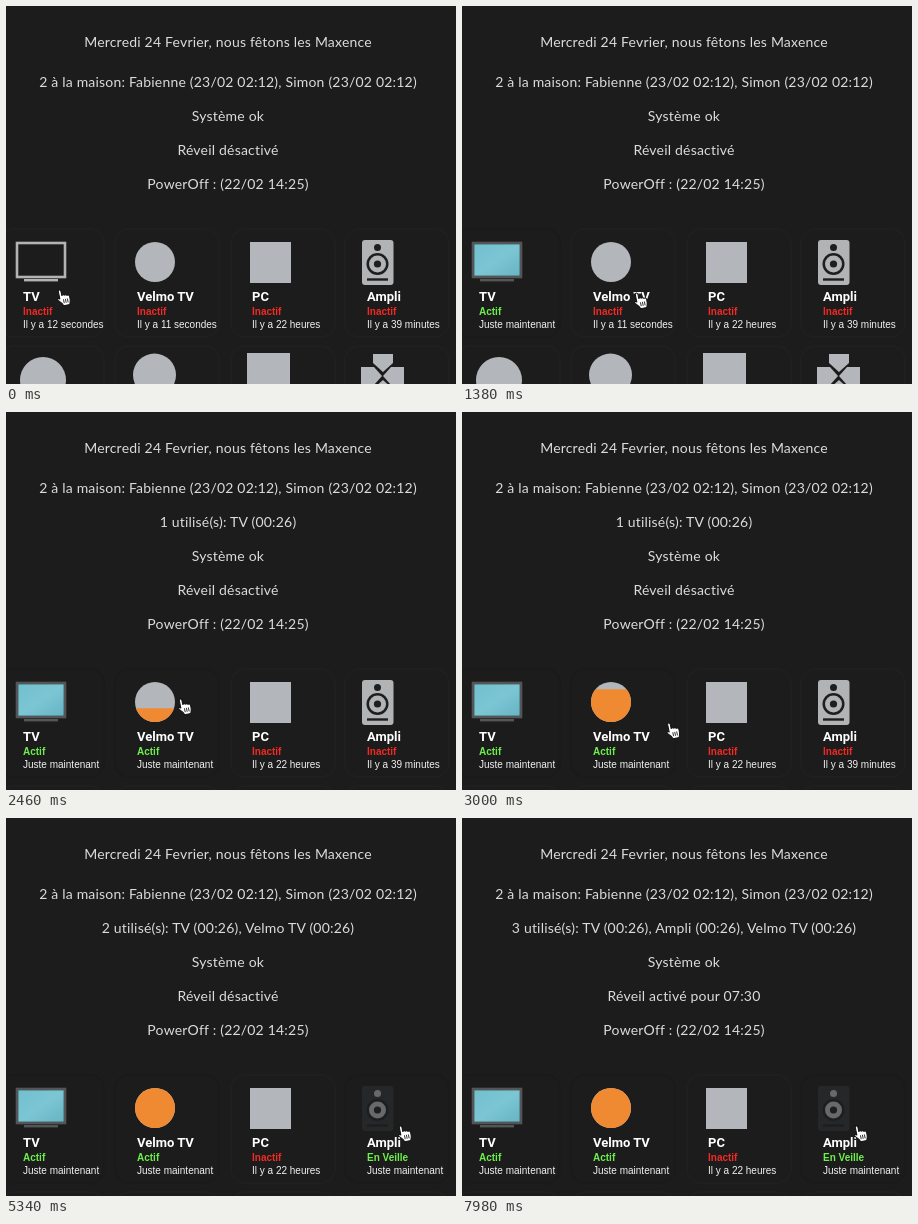
Write an HTML page that moves like this. It is 450 px wide and 378 px high and loops after 8 s.

```html
<!DOCTYPE html>
<html lang="fr">
<head>
<meta charset="utf-8">
<style>
  html, body { margin: 0; width: 100%; height: 100%; overflow: hidden; background: #1c1c1c; }
  svg { display: block; width: 450px; height: 378px; }
  .info { font: 14px Lato, sans-serif; letter-spacing: .2px; fill: #dcdcdc; text-anchor: middle; }
  .name { font: bold 13px Roboto, sans-serif; fill: #fff; }
  .state { font: bold 10px "Liberation Sans", Arial, sans-serif; }
  .since { font: 10px "Liberation Sans", Arial, sans-serif; fill: #f2f2f2; }
  .icon { fill: #b3b6ba; }
  .hole { fill: #1d1e20; }
  .card { fill: none; stroke-width: 2; }
</style>
</head>
<body>
<svg viewBox="0 0 450 378">
  <defs>
    <linearGradient id="glass" x1="0" y1="0" x2="1" y2="1">
      <stop offset="0" stop-color="#72bfce"/>
      <stop offset=".5" stop-color="#7cc6d4"/>
      <stop offset="1" stop-color="#68b4c4"/>
    </linearGradient>
    <clipPath id="level"><rect id="levelRect" x="125" width="50" height="60"/></clipPath>
  </defs>

  <g id="infos"></g>

  <g id="board">
    <g id="cards"></g>

    <g id="tv">
      <rect id="tvFrame" x="11" y="237" width="48" height="34" fill="none" stroke-width="2.6"/>
      <rect id="tvBase" x="18" y="273" width="34" height="2.4"/>
      <rect id="tvScreen" fill="url(#glass)"/>
    </g>

    <circle class="icon" cx="149" cy="256" r="20"/>
    <circle cx="149" cy="256" r="20" fill="#f08a32" clip-path="url(#level)"/>

    <rect class="icon" x="244" y="236" width="41" height="41"/>

    <g id="speaker">
      <rect id="box" x="356" y="234" width="31.5" height="45" rx="3"/>
      <circle id="tweeter" cx="371.5" cy="241.5" r="3.5"/>
      <circle class="hole" cx="371.5" cy="258" r="11"/>
      <circle id="woofer" cx="371.5" cy="258" r="8.5"/>
      <circle class="hole" cx="371.5" cy="258" r="3.6"/>
      <path d="M361 273.5h21" stroke="#1d1e20" stroke-width="2.4"/>
    </g>

    <g class="icon">
      <circle cx="37" cy="374" r="23"/>
      <circle cx="148.5" cy="369" r="21.5"/>
      <rect x="241" y="347" width="43" height="43"/>
      <path d="M367 348h20v9l-10 9-10-9zM355 361h13l8 9-8 9h-13zM398 361h-13l-8 9 8 9h13zM377 374l10 9h-20z"/>
    </g>
  </g>

  <g id="hand" stroke="#111" stroke-linejoin="round">
    <path fill="#fff" d="M2 9V1.5Q2 0 3.3 0T4.6 1.5V6Q6 5 7.2 6.2 8.6 5.4 9.8 6.8 11.6 6.2 12 8V11Q12 13 10.6 16.4H4.4Q3.6 13.5 0 10-.8 8.4.6 8.2 1.4 8.2 2 9z"/>
    <path d="M5.4 10v4M7.4 10v4M9.4 10v4" stroke-width=".8"/>
  </g>
</svg>

<script>
const LOOP = 8000;
const NS = "http://www.w3.org/2000/svg";
const $ = id => document.getElementById(id);

// Moments at which each device or line switches
const TV_ON = 300, LINE_IN = 1440, BOX_ON = 2040, BOX_LISTED = 3600;
const AMP_ON = 4860, AMP_LISTED = 5760, ALARM_ON = 7860;

const CARDS = [
  { x: 17, left: -6, name: "TV", since: "Il y a 12 secondes", on: TV_ON, state: "Actif" },
  { x: 131, left: 109, name: "Velmo TV", since: "Il y a 11 secondes", on: BOX_ON, state: "Actif" },
  { x: 246, left: 225, name: "PC", since: "Il y a 22 heures", on: Infinity },
  { x: 361, left: 339, name: "Ampli", since: "Il y a 39 minutes", on: AMP_ON, state: "En Veille" }
];

// Cursor stops: time, x, y of the fingertip
const PATH = [
  [0, 53, 284], [840, 53, 284], [1020, 151, 288], [1260, 174, 287], [2640, 174, 287],
  [3000, 206, 311], [3540, 382, 311], [3720, 394, 308], [LOOP, 394, 308]
];

function add(parent, tag, attrs, text = "") {
  const el = document.createElementNS(NS, tag);
  set(el, attrs);
  el.textContent = text;
  return parent.appendChild(el);
}

function set(el, attrs) {
  for (const key in attrs) el.setAttribute(key, attrs[key]);
}

const progress = (t, from, to) => Math.min(1, Math.max(0, (t - from) / (to - from)));
const ease = p => p * p * (3 - 2 * p);
const mix = (a, b, p) => a + (b - a) * p;
const gray = (a, b, p) => {
  const v = Math.round(mix(a, b, p));
  return `rgb(${v},${v + 1},${v + 2})`;
};

const infos = [41, 81, 115, 149, 183, 217].map(y => add($("infos"), "text", { class: "info", x: 222, y }));

for (const card of CARDS) {
  card.frames = [223, 340].map(y =>
    add($("cards"), "rect", { class: "card", x: card.left, y, width: 104, height: 108, rx: 14, stroke: "#1f1f1f" }));
  add($("cards"), "text", { class: "name", x: card.x, y: 295 }, card.name);
  card.stateText = add($("cards"), "text", { class: "state", x: card.x, y: 309 });
  card.sinceText = add($("cards"), "text", { class: "since", x: card.x, y: 322 });
}

function usage(t) {
  if (t < LINE_IN) return [];
  if (t < BOX_LISTED) return ["1 utilisé(s): TV (00:26)"];
  if (t < AMP_LISTED) return ["2 utilisé(s): TV (00:26), Velmo TV (00:26)"];
  return ["3 utilisé(s): TV (00:26), Ampli (00:26), Velmo TV (00:26)"];
}

function drawTexts(t) {
  const lines = [
    "Mercredi 24 Fevrier, nous fêtons les Maxence",
    "2 à la maison: Fabienne (23/02 02:12), Simon (23/02 02:12)",
    ...usage(t),
    "Système ok",
    t < ALARM_ON ? "Réveil désactivé" : "Réveil activé pour 07:30",
    "PowerOff : (22/02 14:25)"
  ];
  infos.forEach((el, i) => el.textContent = lines[i] || "");
  for (const card of CARDS) {
    const active = t >= card.on;
    card.frames[0].setAttribute("stroke", active ? "#1a1a1a" : "#1f1f1f");
    card.stateText.textContent = active ? card.state : "Inactif";
    card.stateText.setAttribute("fill", active ? "#6df04c" : "#f02a24");
    card.sinceText.textContent = active ? "Juste maintenant" : card.since;
  }
}

function drawTv(t) {
  const frame = gray(178, 84, progress(t, 240, 540));
  const width = 45.4 * ease(progress(t, 420, 780));
  const height = mix(2, 31.4, ease(progress(t, 900, 1380)));
  $("tvFrame").setAttribute("stroke", frame);
  $("tvBase").setAttribute("fill", frame);
  set($("tvScreen"), { x: 35 - width / 2, y: 254 - height / 2, width, height });
}

function drawSpeaker(t) {
  const p = ease(progress(t, AMP_ON, AMP_ON + 420));
  $("box").setAttribute("fill", gray(178, 38, p));
  $("woofer").setAttribute("fill", gray(178, 104, p));
  $("tweeter").setAttribute("fill", gray(29, 104, p));
}

function drawHand(t) {
  const i = PATH.findIndex((stop, k) => k > 0 && t <= stop[0]);
  const [t0, x0, y0] = PATH[i - 1], [t1, x1, y1] = PATH[i];
  const p = progress(t, t0, t1);
  $("hand").setAttribute("transform",
    `translate(${mix(x0, x1, p)} ${mix(y0, y1, p)}) rotate(-12) translate(-3 0)`);
}

function render(t) {
  drawTexts(t);
  drawTv(t);
  $("levelRect").setAttribute("y", mix(277, 235, progress(t, BOX_ON, 3240)));
  drawSpeaker(t);
  $("board").setAttribute("transform", `translate(0 ${t < LINE_IN ? 0 : 34})`);
  drawHand(t);
}

const start = performance.now();
function tick() {
  render((performance.now() - start) % LOOP);
  requestAnimationFrame(tick);
}
tick();
</script>
</body>
</html>
```
